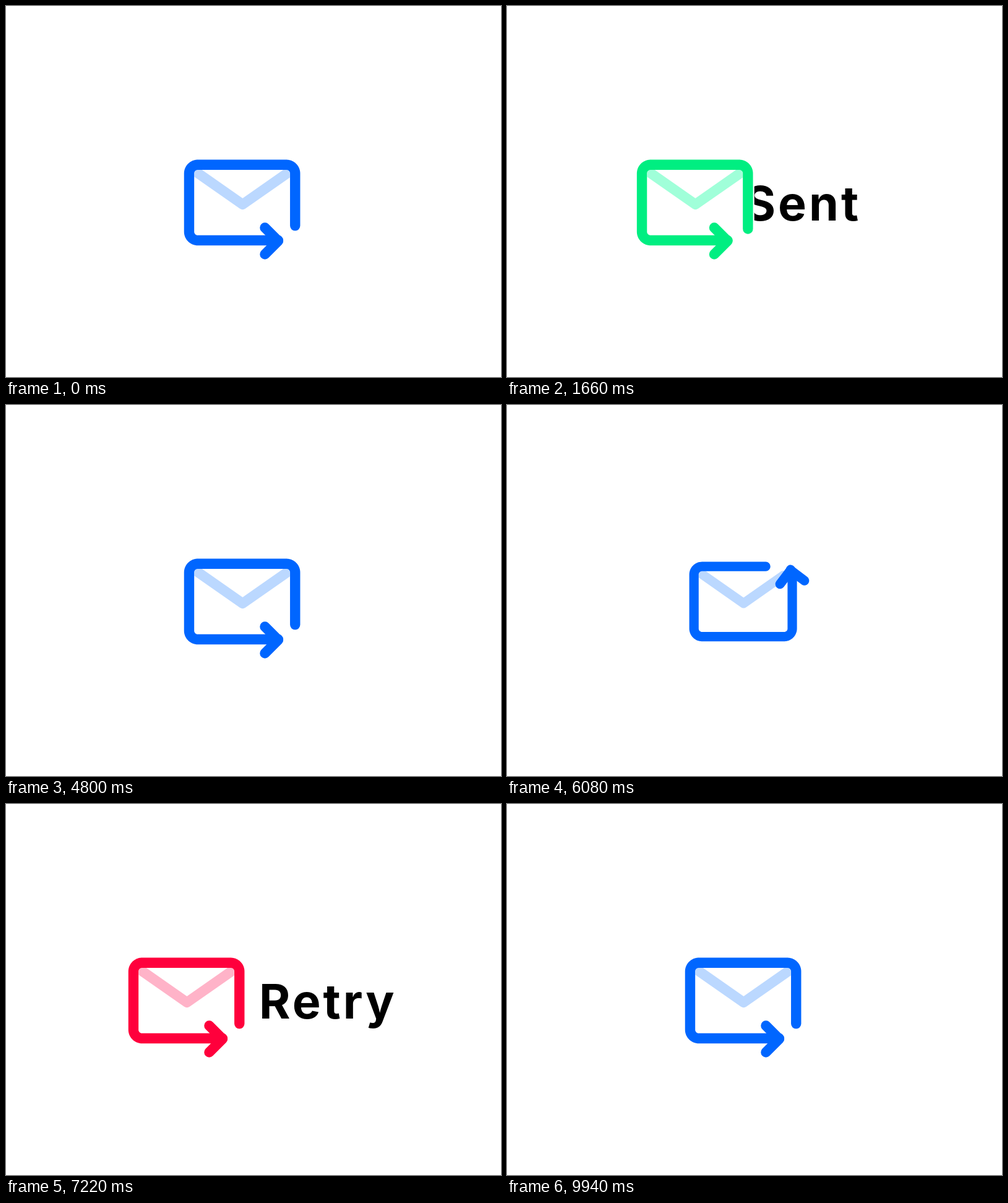
An HTML page with a canvas for the animation above (10000 ms loop, 800 by 600 pixels).

```html
<!DOCTYPE html>
<html lang="en">
<head>
<meta charset="utf-8">
<title>Mail status</title>
<style>
html, body { margin: 0; width: 100%; height: 100%; overflow: hidden; background: #fff; }
canvas { display: block; }
</style>
</head>
<body>
<canvas id="stage" width="800" height="600"></canvas>
<script>
const ctx = document.getElementById('stage').getContext('2d');
const LOOP = 10000;
const W = 171.3, H = 122.3, R = 14, ARC = R * Math.PI / 2, STROKE = 16.4;
const PERIMETER = 2 * (W + H - 4 * R) + 4 * ARC;
const HOME = 130; // resting tip, measured from the start of the bottom edge
const BLUE = { line: [0, 102, 255], flap: [187, 216, 255] };
const SCENES = [
  { start: 0, out: [3820, 4800], word: 'Sent',
    line: [0, 238, 129], flap: [160, 255, 217] },
  { start: 5290, out: [9130, 9940], word: 'Retry',
    line: [255, 0, 60], flap: [255, 179, 200] }
];

const clamp = v => Math.min(1, Math.max(0, v));
const ramp = (t, a, b) => clamp((t - a) / (b - a));
const ease = (u, n) => u < 0.5 ? 0.5 * (2 * u) ** n : 1 - 0.5 * (2 - 2 * u) ** n;
const mix = (a, b, k) => `rgb(${a.map((v, i) => Math.round(v + (b[i] - v) * k))})`;

// Point on the rounded outline, counterclockwise from the resting tip.
function at(dist) {
  let s = (((dist + HOME) % PERIMETER) + PERIMETER) % PERIMETER;
  let x = R - W / 2, y = H / 2, a = 0;
  for (let i = 0; i < 4; i++) {
    const len = (i % 2 ? H : W) - 2 * R;
    if (s <= len) return [x + Math.cos(a) * s, y + Math.sin(a) * s];
    s -= len;
    x += Math.cos(a) * len;
    y += Math.sin(a) * len;
    const cx = x + R * Math.sin(a), cy = y - R * Math.cos(a);
    const b = a - Math.min(s, ARC) / R;
    x = cx - R * Math.sin(b);
    y = cy + R * Math.cos(b);
    if (s <= ARC) return [x, y];
    s -= ARC;
    a = b;
  }
  return [x, y];
}

function polyline(points, color) {
  ctx.beginPath();
  points.forEach(p => ctx.lineTo(p[0], p[1]));
  ctx.strokeStyle = color;
  ctx.stroke();
}

function drawFlap(color) {
  ctx.save();
  ctx.beginPath();
  ctx.roundRect(8.5 - W / 2, 7.5 - H / 2, W - 17, H - 16, 7);
  ctx.clip();
  polyline([[-80, -53.5], [0.8, 3], [81.6, -53.5]], color);
  ctx.restore();
}

function drawOutline(p, color) {
  const tip = p * PERIMETER;
  const gap = 45 + 12 * Math.max(0, Math.sin(Math.PI * (p - 0.25) / 0.75));
  const length = PERIMETER - gap, steps = 360;
  const points = [];
  for (let i = 0; i <= steps; i++) points.push(at(tip - length * i / steps));
  polyline(points, color);

  const [x, y] = at(tip), [bx, by] = at(tip - 22);
  ctx.save();
  ctx.translate(x, y + 1);
  ctx.rotate(Math.atan2(y - by, x - bx));
  polyline([[-21.5, -21.5], [0, 0], [-21.5, 21.5]], color);
  ctx.restore();
}

function drawWord(word, shown, edge) {
  if (shown <= 0) return;
  ctx.save();
  ctx.beginPath();
  ctx.rect(edge, 200, 800 - edge, 250);
  ctx.clip();
  ctx.font = '700 77px Inter, "Open Sans", sans-serif';
  ctx.letterSpacing = '4px';
  ctx.fillStyle = '#000';
  const slide = ctx.measureText(word).width * (1 - shown);
  ctx.fillText(word, 409 - slide, 347);
  ctx.restore();
}

function draw(time) {
  const scene = SCENES[time < 5000 ? 0 : 1];
  const t = time - scene.start;
  const back = ease(ramp(time, ...scene.out), 2.4);
  const spin = ease(ramp(t, 0, 1960), 3.3);
  const moved = ease(ramp(t, 1000, 1930), 2.4) * (1 - back);
  const tint = ease(ramp(t, 900, 1400), 2) * (1 - back);
  const dip = ease(ramp(t, 0, 680), 2) - ease(ramp(t, 680, 1200), 2);
  const scale = 1 - 0.08 * dip;
  const cx = 381.6 - 90 * moved;

  ctx.fillStyle = '#fff';
  ctx.fillRect(0, 0, 800, 600);
  drawWord(scene.word, moved, cx + 96);

  ctx.save();
  ctx.translate(cx, 317.9);
  ctx.scale(scale, scale);
  ctx.lineWidth = STROKE;
  ctx.lineCap = ctx.lineJoin = 'round';
  drawFlap(mix(BLUE.flap, scene.flap, tint));
  drawOutline(spin, mix(BLUE.line, scene.line, tint));
  ctx.restore();
}

const begin = performance.now();
function tick() {
  draw((performance.now() - begin) % LOOP);
  requestAnimationFrame(tick);
}
tick();
</script>
</body>
</html>
```
